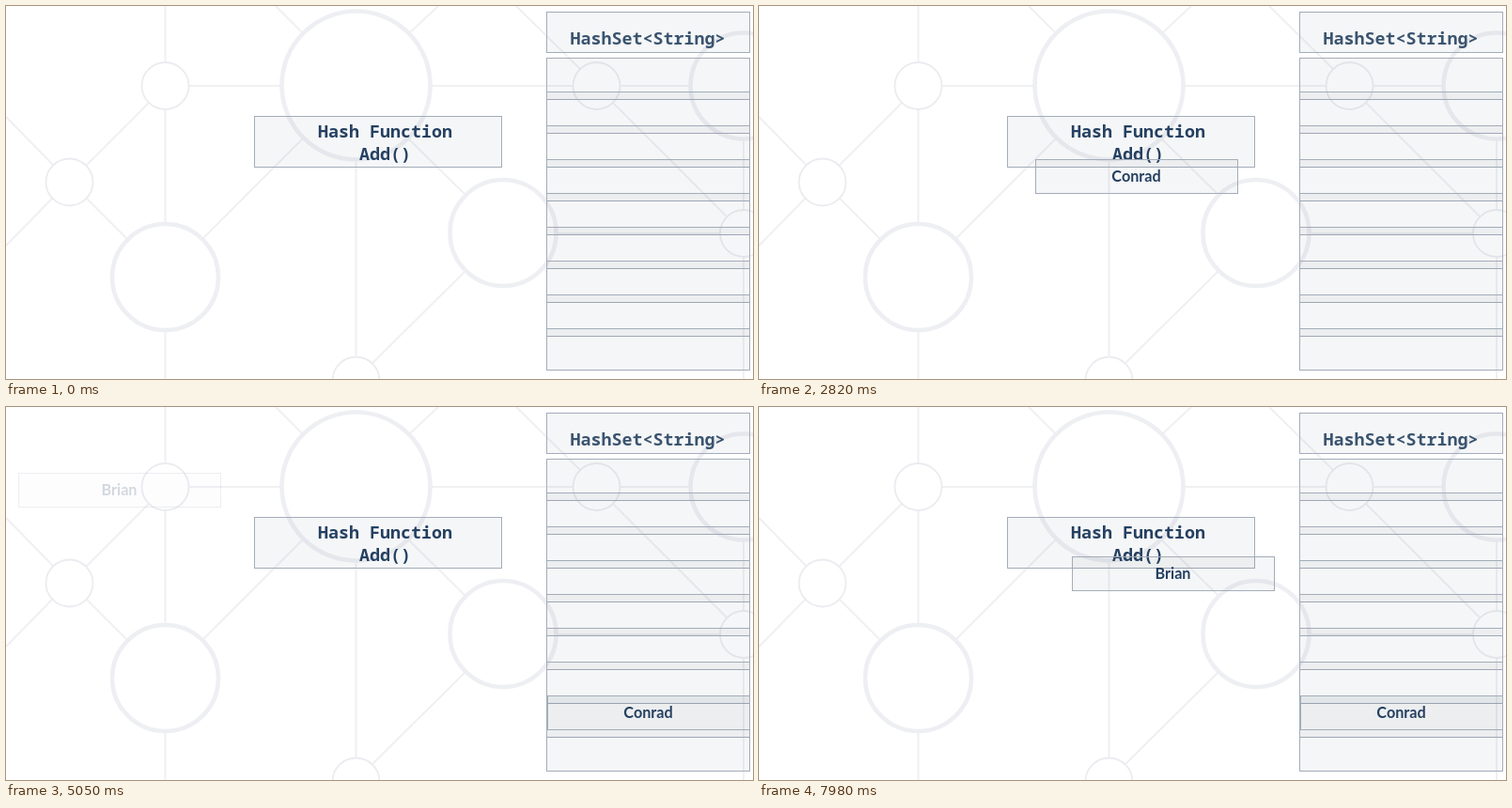
These frames come from a looping animation (795 px wide and 397 px high, 8 s). An HTML page:

```html
<!DOCTYPE html>
<html lang="en">
<head>
<meta charset="utf-8">
<title>HashSet add</title>
<style>
  html, body { margin: 0; width: 100%; height: 100%; overflow: hidden; background: #fff; }
  svg { display: block; width: 795px; height: 397px; }
  .net { fill: none; stroke: #f0f0f3; stroke-width: 2; }
  .net .node { stroke: #ebecf0; stroke-width: 1.8; }
  .net .hub { stroke: #eeeff3; stroke-width: 4.6; }
  .box { fill: rgba(68, 84, 106, .05); stroke: #a3acb9; stroke-width: 1; }
  text { text-anchor: middle; font-weight: 700; fill: #254061; }
  .mono { font-family: "Noto Sans Mono", "DejaVu Sans Mono", monospace; font-size: 18.33px; }
  .head { fill: #3a5470; }
  .chip text { font-family: Lato, "Open Sans", sans-serif; font-size: 16.2px; }
</style>
</head>
<body>
<svg viewBox="0 0 795 397">
  <g class="net">
    <path d="M169.5 0V60M169.5 110V230M169.5 347V397M195 85H292M453 85H603M654 85H727
      M587 242H760M785 143V217M785 267V397M372.5 166V373
      M287 0L317 30M460 0L428 30M543 0L611 67M646 103L767 224
      M0 118L50 169M152 103L85 170M86 205L130 249M50 204L0 255
      M317 140L208 249M429 142L490 202M490 281L390 380"/>
    <g class="node">
      <circle cx="169.5" cy="85" r="25"/>
      <circle cx="67.5" cy="187.5" r="25"/>
      <circle cx="628.5" cy="85" r="25"/>
      <circle cx="785" cy="242" r="25"/>
      <circle cx="372.5" cy="398.5" r="25"/>
    </g>
    <g class="hub">
      <circle cx="372.5" cy="84.5" r="79"/>
      <circle cx="169.5" cy="288.5" r="56.5"/>
      <circle cx="529" cy="241.5" r="56.5"/>
      <circle cx="785" cy="85" r="56.5"/>
    </g>
  </g>

  <text class="mono head" x="683" y="41">HashSet&lt;String&gt;</text>
  <rect class="box" x="575.5" y="6.5" width="216" height="43"/>
  <g id="cells"></g>

  <rect class="box" x="264.5" y="117.5" width="263" height="54"/>
  <text class="mono" x="403.5" y="140">Hash Function</text>
  <text class="mono" x="403.5" y="164">Add()</text>

  <g id="chips"></g>
</svg>
<script>
  const LOOP = 8000, STEP = 1000 / 13, FIRST = 360;
  const FADE = 434, MOVE = 1735;

  // Each chip fades in, then travels along two straight legs.
  const chips = [
    { name: 'Conrad', fade: 341, legs: [925, 2884], path: [[13, 237], [294, 163], [576, 307]] },
    { name: 'Brian', fade: 4968, legs: [5552, 7522], path: [[13, 70], [294.5, 164], [576, 127]] }
  ];

  function add(parent, tag, attrs) {
    const el = document.createElementNS('http://www.w3.org/2000/svg', tag);
    for (const key in attrs) el.setAttribute(key, attrs[key]);
    return parent.appendChild(el);
  }

  const cells = document.getElementById('cells');
  for (let i = 0; i < 9; i++) {
    add(cells, 'rect', { class: 'box', x: 575.5, y: 55.5 + 36 * i, width: 216, height: 44 });
  }

  for (const chip of chips) {
    chip.el = add(document.getElementById('chips'), 'g', { class: 'chip', opacity: 0 });
    add(chip.el, 'rect', { class: 'box', x: .5, y: .5, width: 215, height: 36 });
    add(chip.el, 'text', { x: 107.5, y: 24 }).textContent = chip.name;
  }

  const clamp = u => Math.min(1, Math.max(0, u));
  const ease = u => u < .5 ? 2 * u * u : 1 - 2 * (1 - u) ** 2;

  function place(chip, t) {
    const k = chip.legs.map(start => ease(clamp((t - start) / MOVE)));
    const [a, b, c] = chip.path;
    const at = i => Math.round(a[i] + (b[i] - a[i]) * k[0] + (c[i] - b[i]) * k[1]);
    chip.el.setAttribute('transform', `translate(${at(0)} ${at(1)})`);
    chip.el.setAttribute('opacity', clamp((t - chip.fade) / FADE));
  }

  // The picture advances 13 times a second.
  function draw(ms) {
    const n = Math.floor((ms - FIRST + 8) / STEP);
    const t = n < 0 ? 0 : FIRST + n * STEP;
    for (const chip of chips) place(chip, t);
  }

  const begin = performance.now();
  function tick() {
    draw((performance.now() - begin) % LOOP);
    requestAnimationFrame(tick);
  }
  tick();
</script>
</body>
</html>
```
